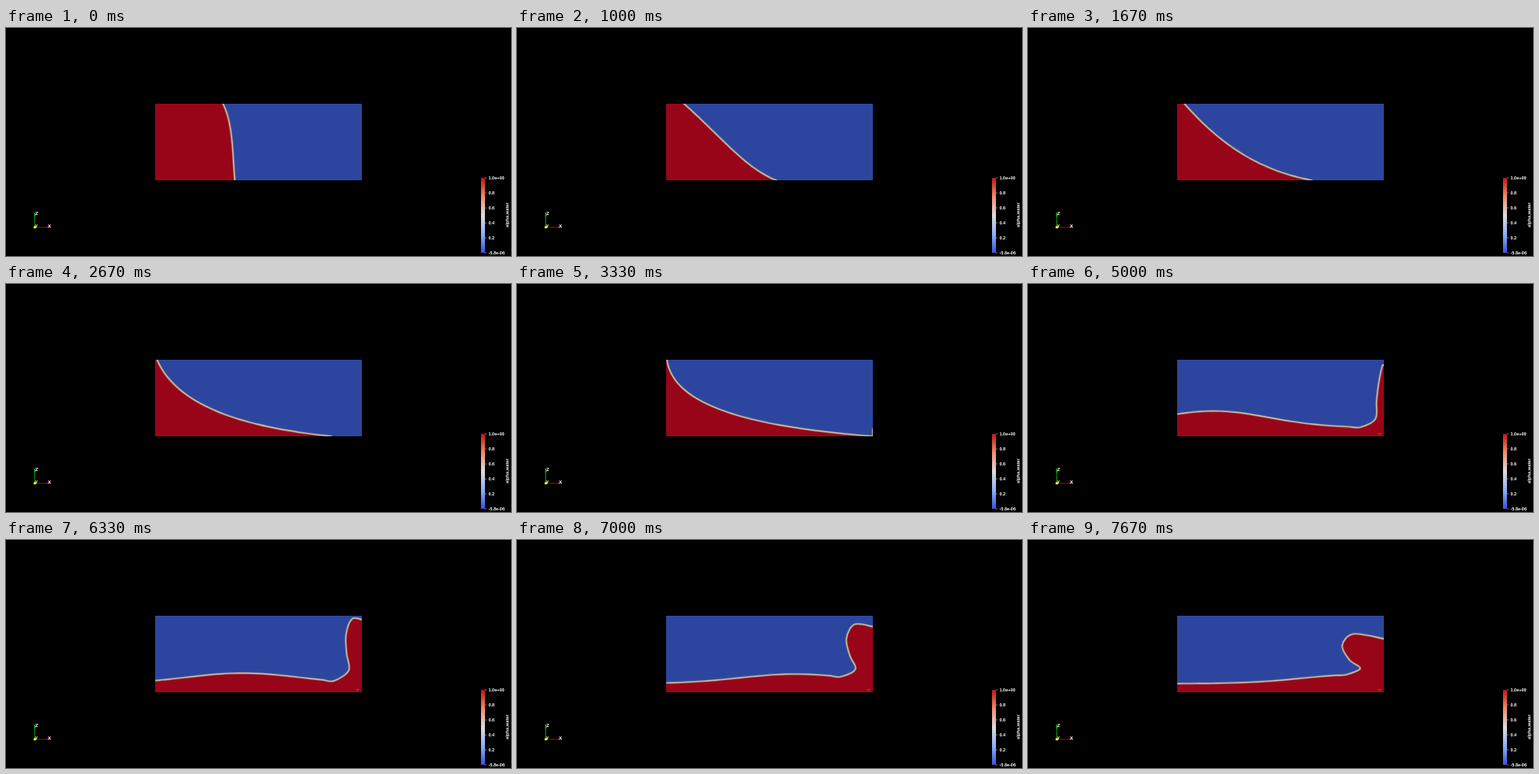
An HTML page with a canvas for the animation above (8 s loop, 640x289 px).

```html
<!DOCTYPE html>
<html lang="en">
<head>
<meta charset="utf-8">
<title>Dam break, alpha.water</title>
<style>
  html, body { margin: 0; width: 100%; height: 100%; overflow: hidden; background: #000; }
  canvas { display: block; width: 640px; height: 289px; }
</style>
</head>
<body>
<canvas id="stage" width="640" height="289"></canvas>
<script>
const ctx = document.getElementById('stage').getContext('2d');
const LOOP = 8000, STEPS = 24;
const IMPACT = 3.33;  // seconds until the toe reaches the right wall
const LEFT = 189, TOP = 96, RIGHT = 451, FLOOR = 193;
const FONT = '"Liberation Sans", Arial, sans-serif';

const mix = (a, b, u) => a + (b - a) * u;
const decay = (s, tau) => Math.exp(-s / tau);
const smooth = u => {
  u = Math.max(0, Math.min(1, u));
  return u * u * (3 - 2 * u);
};
const bezier = (a, b, c, d, u) => {
  const v = 1 - u;
  return v * v * v * a + 3 * v * v * u * b + 3 * v * u * u * c + u * u * u * d;
};

// Collapsing column: one cubic whose control points drift with time
function slump(s, toe) {
  const xs = [LEFT + 86 * decay(s, 0.75), 288 - 27 * s, 287 + 3 * s, toe];
  const ys = [TOP, 159 - 37 * decay(s, 1.5), 181 - 21 * decay(s, 0.5), FLOOR];
  return Array.from({ length: 25 }, (_, i) => [bezier(...xs, i / 24), bezier(...ys, i / 24)]);
}

// Long wave that runs to the right as the water settles
function wave(x, s) {
  const d = s - 5;
  const crest = 235 + 28.6 * d + 15.2 * d * d;
  const height = 11 + 10 * decay(d, 0.9);
  return 182 - height * Math.exp(-(((x - crest) / 100) ** 2));
}

// Jet that climbs the right wall, then curls over to the left
function jet(age, rise, curl) {
  const s = age + IMPACT, fold = curl / 38;
  const wall = 98 + 7 * (s - 5.7) ** 2 + 47 * decay(age, 0.5);
  const front = wall + rise * (25 - 16 * fold);
  const neck = 161 + 31 * decay(age, 1.5);
  return [
    [RIGHT - 10 * rise - 0.52 * curl, neck],
    [RIGHT - 7.5 * rise - 0.93 * curl, (front + neck) / 2 + 4 * fold],
    [RIGHT - 4 * rise - 1.27 * curl, front],
    [RIGHT - curl, wall + 2 - 8 * fold],
    [RIGHT, wall]
  ];
}

function surface(s) {
  if (s < IMPACT) return slump(s, 290 + 34.5 * s + 4.2 * s * s);
  const age = s - IMPACT;
  const rise = 1 - decay(age, 0.5), curl = 0.47 * age ** 3;
  const corner = RIGHT - 29 * rise - 0.5 * curl;
  const settled = smooth(age / 1.67);
  const film = slump(IMPACT, corner).map(([x, y]) => [x, mix(y, wave(x, s), settled)]);
  return film.concat(jet(age, rise, curl));
}

// Smooth curve through the points
function trace(path, pts) {
  const at = i => pts[Math.max(0, Math.min(pts.length - 1, i))];
  for (let i = 0; i < pts.length - 1; i++) {
    const [a, b, c, d] = [at(i - 1), at(i), at(i + 1), at(i + 2)];
    path.bezierCurveTo(
      b[0] + (c[0] - a[0]) / 6, b[1] + (c[1] - a[1]) / 6,
      c[0] - (d[0] - b[0]) / 6, c[1] - (d[1] - b[1]) / 6, c[0], c[1]);
  }
}

function drawTank(s) {
  const pts = surface(s), first = pts[0], end = pts[pts.length - 1];

  const line = new Path2D();
  line.moveTo(...first);
  trace(line, pts);

  const water = new Path2D();
  water.moveTo(LEFT, first[1]);
  water.lineTo(...first);
  trace(water, pts);
  water.lineTo(end[0], FLOOR);
  water.lineTo(LEFT, FLOOR);

  ctx.save();
  ctx.beginPath();
  ctx.rect(LEFT, TOP, RIGHT - LEFT, FLOOR - TOP);
  ctx.clip();
  ctx.fillStyle = '#2c469f';
  ctx.fillRect(LEFT, TOP, RIGHT - LEFT, FLOOR - TOP);
  ctx.fillStyle = '#980518';
  ctx.fill(water);

  ctx.lineJoin = 'round';
  ctx.lineCap = 'square';
  for (const [width, color] of [[3, 'rgba(140,125,135,.6)'], [1.4, '#cfbf9e']]) {
    ctx.lineWidth = width;
    ctx.strokeStyle = color;
    ctx.stroke(line);
  }

  // Air pocket in the corner
  if (s > 4.3) {
    ctx.fillStyle = 'rgba(150,75,80,.7)';
    ctx.beginPath();
    ctx.ellipse(445.5, 189.8, 2.2, 1.1, -0.3, 0, 7);
    ctx.fill();
  }
  ctx.restore();
}

function label(text, x, y, size, color = '#fff') {
  ctx.font = `bold ${size}px ${FONT}`;
  ctx.fillStyle = color;
  ctx.fillText(text, x, y);
}

function segment(x1, y1, x2, y2, color, width = 1) {
  ctx.strokeStyle = color;
  ctx.lineWidth = width;
  ctx.beginPath();
  ctx.moveTo(x1, y1);
  ctx.lineTo(x2, y2);
  ctx.stroke();
}

function drawAxes() {
  segment(36.5, 238, 36.5, 251, '#0c960c');
  segment(36.5, 234, 36.5, 239, '#14b414', 1.8);
  segment(38, 252.5, 53, 252.5, '#960a0a');
  segment(52, 252.5, 57, 252.5, '#b00c0c', 1.8);
  ctx.fillStyle = '#e8e020';
  ctx.fillRect(35, 251, 3, 3);
  ctx.textAlign = 'left';
  ctx.textBaseline = 'middle';
  label('Z', 37, 235.3, 6.2);
  label('X', 53, 251, 6.2);
  label('Y', 36.7, 251, 5.5, '#ffffc0');
}

function drawLegend() {
  const top = 190, height = 95;
  const ramp = ctx.createLinearGradient(0, top, 0, top + height);
  ['#c01418', '#f08c64', '#dcdcdc', '#8caffe', '#3a50dc']
    .forEach((color, i) => ramp.addColorStop(i / 4, color));
  ctx.fillStyle = ramp;
  ctx.fillRect(602, top, 5, height);

  ctx.textAlign = 'left';
  ctx.textBaseline = 'middle';
  ['1.0e+00', '0.8', '0.6', '0.4', '0.2', '-5.8e-06'].forEach((text, i) => {
    const y = top + height * i / 5;
    segment(607, y, 609, y, '#aaa', 0.7);
    label(text, 611.5, y, 5.5);
  });

  ctx.save();
  ctx.translate(635.3, 237);
  ctx.rotate(-Math.PI / 2);
  ctx.textAlign = 'center';
  label('alpha.water', 0, 0, 5.7);
  ctx.restore();
}

// The solver output advances three times a second
const stepTime = k => Math.round(k * 100 / 3) * 10;

function frame(now) {
  const t = now % LOOP;
  let k = STEPS - 1;
  while (k > 0 && stepTime(k) > t) k--;
  ctx.fillStyle = '#000';
  ctx.fillRect(0, 0, 640, 289);
  drawTank(stepTime(k) / 1000);
  drawAxes();
  drawLegend();
}

const start = performance.now();
function tick() {
  frame(performance.now() - start);
  requestAnimationFrame(tick);
}
tick();
</script>
</body>
</html>
```
